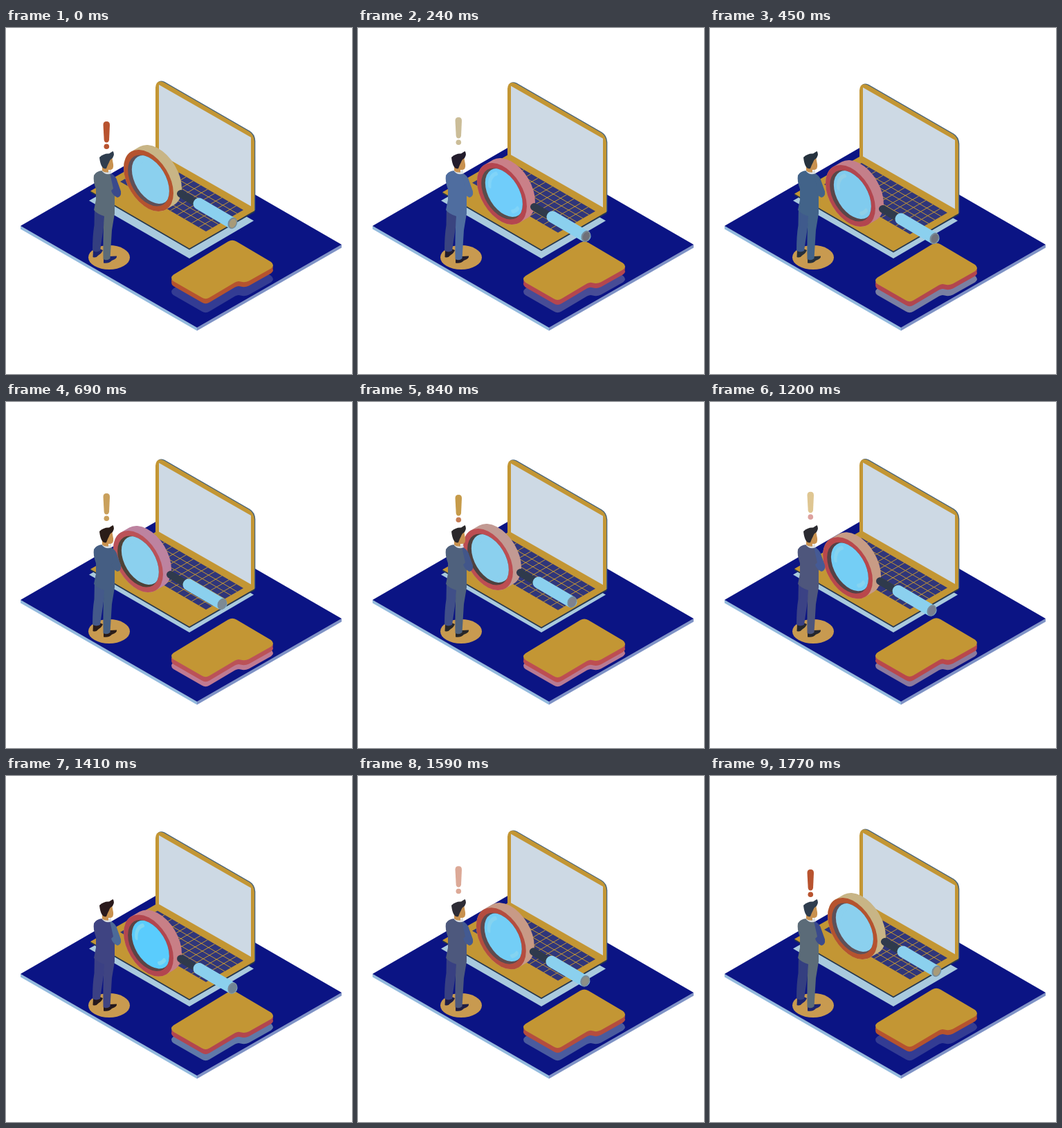
An HTML page that plays this animation: 500 px wide and 500 px high, repeating every 1830 ms.

```html
<!DOCTYPE html>
<html lang="en">
<head>
<meta charset="utf-8">
<title>Isometric search</title>
<style>
html, body { margin: 0; width: 100%; height: 100%; overflow: hidden; background: #fff; }
svg { display: block; width: 100vw; height: 100vh; }
.gold { fill: #c39634; }
.line { fill: none; stroke-linecap: round; }
</style>
</head>
<body>
<svg viewBox="0 0 500 500">
  <defs>
    <path id="folder" d="M242 356.500L321 308.500Q327 305 333 308.500L383 338Q389 343 383 347.500L351 365.500Q345 368.500 339 366.500Q335.500 365 331 367.500L294 389.500Q288.500 393 283 389.500L242 366Q236 361 242 356.500Z"/>
    <path id="lid" d="M216 186V86Q217 74 228 78.500L351 149.500Q358.500 154 359 164V264L355 266Z"/>
    <clipPath id="hole"><circle r="34.500"/></clipPath>
  </defs>

  <!-- mat -->
  <path fill="#93badd" d="M21 286L276 433V437.500L21 290.500Z"/>
  <path fill="#7f93c6" d="M485 313L276 433V437.500L485 317.500Z"/>
  <path fill="#0b1484" d="M21 286L229.500 165.500L485 313L276 433Z"/>

  <!-- laptop -->
  <path fill="#a9cade" d="M120 249.500L214 196L358 278.500L265 333Z"/>
  <g class="lift">
    <path fill="#26384f" d="M122 236V237.500L265 320.500L359.500 266V262Z"/>
    <path class="gold" d="M122 235.500L216 182L359 264L265 318.500Z"/>
    <g transform="matrix(124 72 -54 31 219 191)">
      <path fill="#30367a" d="M0 0H1V1H0Z"/>
      <path id="keys" fill="none" stroke="#c39634" vector-effect="non-scaling-stroke"/>
    </g>
    <use href="#lid" x="1.300" y="-.7" fill="#47637a"/>
    <use href="#lid" class="gold"/>
    <path fill="#cdd9e4" d="M221 82L354 158V257.500L221 181.500Z"/>
  </g>

  <!-- folder -->
  <use href="#folder" y="20" fill="var(--shade)"/>
  <g class="lift">
    <g fill="var(--rim)">
      <use href="#folder" y="7"/>
      <use href="#folder" y="3.500"/>
    </g>
    <use href="#folder" class="gold"/>
  </g>

  <!-- magnifier -->
  <g id="glass">
    <g transform="matrix(.866 .44 0 .98 206 220.500)">
      <path class="line" stroke="var(--side)" stroke-width="83" d="M0 0L13.900-13.400"/>
      <circle r="41.500" fill="var(--rim)"/>
      <circle r="34.500" fill="var(--hole)"/>
      <g clip-path="url(#hole)">
        <g transform="translate(4.600 -3.600)">
          <circle r="32.500" fill="var(--lens)"/>
          <path class="line" stroke="var(--glint)" stroke-width="5" d="M-25 2A26 26 0 0 1-14-22M13 22A26 26 0 0 0 22 13"/>
        </g>
      </g>
    </g>
    <path class="line" stroke="#2f3a4c" stroke-width="11" d="M252.500 239.500L272 251"/>
    <path class="line" stroke="#8bd0ee" stroke-width="17" d="M279 254L326 281.500"/>
    <g transform="translate(327.300 282) rotate(24)">
      <ellipse rx="6.500" ry="8.500" fill="#788b99"/>
      <ellipse cx=".5" rx="4.700" ry="6.700" fill="var(--cap)"/>
    </g>
  </g>

  <!-- man -->
  <ellipse cx="149" cy="331.500" rx="30" ry="17.500" fill="#c89a50"/>
  <g fill="var(--shoe)">
    <path d="M126 321L135 319L140 321Q138 326 134 328Q130 333 125.500 331Z"/>
    <path d="M141 332L150 330L160 329.500Q161 333 153 336Q148 341 141 339.500Z"/>
  </g>
  <path fill="var(--leg)" d="M128 258L144 268L136 322Q130 325 125 321.500Q125 300 127.500 285Z"/>
  <path fill="var(--suit)" d="M139 206Q130 207 127 213Q125.500 221 130 233L130 248L127 263Q132 269 142 272Q140 294 140.500 334Q146 337 150.500 333L153 292L157 268V244L156 220L150 209Z"/>
  <path fill="var(--sleeve)" d="M150 209Q159 213 161 222L166 236Q167 244 161 245Q154 242 152 235L155 232Z"/>
  <path fill="#d9dee2" d="M138 206L147 208.500L151 204.500L153 210Q144 214 138 206Z"/>
  <path fill="#c8914f" d="M139 200L145 191L153 186L155 197Q156 204 151 205L148 205V208.500Q141 209 139 206Z"/>
  <path fill="var(--hair)" d="M135 187Q141 181 149 181.500L154.500 178Q157.500 182 154 188Q150 190 149 194L147 198L145 203Q137 205 135 187Z"/>

  <!-- alert -->
  <g id="alert">
    <path fill="var(--bang)" d="M140.500 140Q140.500 135 145.300 135Q150 135 150 140L149 162Q148 165.500 145.300 165.500Q142.500 165.500 141.700 162Z"/>
    <circle cx="145.300" cy="171.300" r="3.800" fill="var(--dot)"/>
  </g>
</svg>
<script>
const LOOP = 1830, STEP = 30, LAST = 1770;

// time, lift, glass x, glass y, alert y
const poses = [
  [0, 0, 0, 0, 0],
  [240, 1.8, 2, 19, -6],
  [450, 4, -3, 22, -8],
  [690, 6, -15, 10, -3],
  [860, 6.8, -18, 7, -1],
  [1020, 6.6, -14, 11, -1.5],
  [1410, 3.7, 0, 24.5, -8],
  [LAST, 0, 0, 0, 0]
];

const tintTimes = [0, 240, 450, 690, 1020, 1410, LAST];
const tints = {
  suit: '5b6b78 4f6d9f 426389 455e83 5a6576 3f4482',
  sleeve: '3a4a8c 4f6d9f 426389 455e83 3f4c93 4c6a98',
  leg: '343f80 3a4480 3f5a8c 44598a 3b4486 3b4084',
  hair: '2f3d4e 231c2c 26323e 2a1c18 2a3742 2a1a1c',
  shoe: '1c2470 221c2c 26303c 2a1c18 26343e 24181c',
  rim: 'b5532f b4464f b2464f bb5258 bf4a4a b2464f',
  side: 'c8b586 ca8088 c47f8a bd83a0 c8b584 c87f86',
  hole: '5f5058 5a4c4c 5a4648 4f4238 503f48 5c4444',
  lens: '8bd0ee 70cdfa 80cbee 8bd0ee 8bd0ee 5accfd',
  glint: '8bd0ee 80d4f8 8fcfe8 8bd0ee 8bd0ee 7dd6f2',
  cap: 'a89a78 6f7078 70727c 7d8a94 80788c 6f8494',
  shade: '333c93 474c96 7a80a2 bf7a92 b07a94 6079a8',
  bang: 'b8532f cbbd98 ffffff c9a05c c39634 ffffff',
  dot: 'b8532f cbbd98 ffffff c9a05c c0504a ffffff'
};
const channels = hex => [0, 2, 4].map(i => parseInt(hex.substr(i, 2), 16));
for (const name in tints) {
  const list = tints[name].split(' ').map(channels);
  tints[name] = [...list, list[0]];
}

// Index of the key span holding t, and the progress through it
function span(times, t) {
  let i = 0;
  while (i < times.length - 2 && t >= times[i + 1]) i++;
  return [i, (t - times[i]) / (times[i + 1] - times[i])];
}

// Smooth curve through the poses, wrapping round the loop
const poseTimes = poses.map(p => p[0]);
function slope(i, c) {
  const n = poses.length, a = poses[(i + n - 1) % n], b = poses[(i + 1) % n];
  return (b[c] - a[c]) / ((b[0] - a[0] + LOOP) % LOOP);
}
function pose(t, c) {
  const [i, u] = span(poseTimes, t), a = poses[i], b = poses[i + 1];
  const d = b[0] - a[0], v = 1 - u, s = u * u * (3 - 2 * u);
  return a[c] + (b[c] - a[c]) * s + d * u * v * (v * slope(i, c) - u * slope(i + 1, c));
}

const $ = id => document.getElementById(id);
const lifts = document.querySelectorAll('.lift');
const root = document.documentElement.style;
const move = (el, x, y) => el.setAttribute('transform', `translate(${x} ${y})`);

let grid = '';
for (let i = 1; i < 12; i++) grid += `M${i / 12} 0V1`;
for (let i = 1; i < 6; i++) grid += `M0 ${i / 6}H1`;
$('keys').setAttribute('d', grid);

function draw(now) {
  const phase = now % LOOP, t = Math.min(LAST, phase - phase % STEP);
  const [lift, gx, gy, ay] = [1, 2, 3, 4].map(c => pose(t, c));
  lifts.forEach(el => move(el, 0, lift));
  move($('glass'), gx, gy);
  move($('alert'), 0, ay);
  const [i, u] = span(tintTimes, t);
  for (const name in tints) {
    const [a, b] = [tints[name][i], tints[name][i + 1]];
    root.setProperty('--' + name, `rgb(${a.map((v, k) => Math.round(v + (b[k] - v) * u))})`);
  }
}

let start;
function tick(now) {
  start ??= now;
  draw(now - start);
  requestAnimationFrame(tick);
}
draw(0);
requestAnimationFrame(tick);
</script>
</body>
</html>
```
